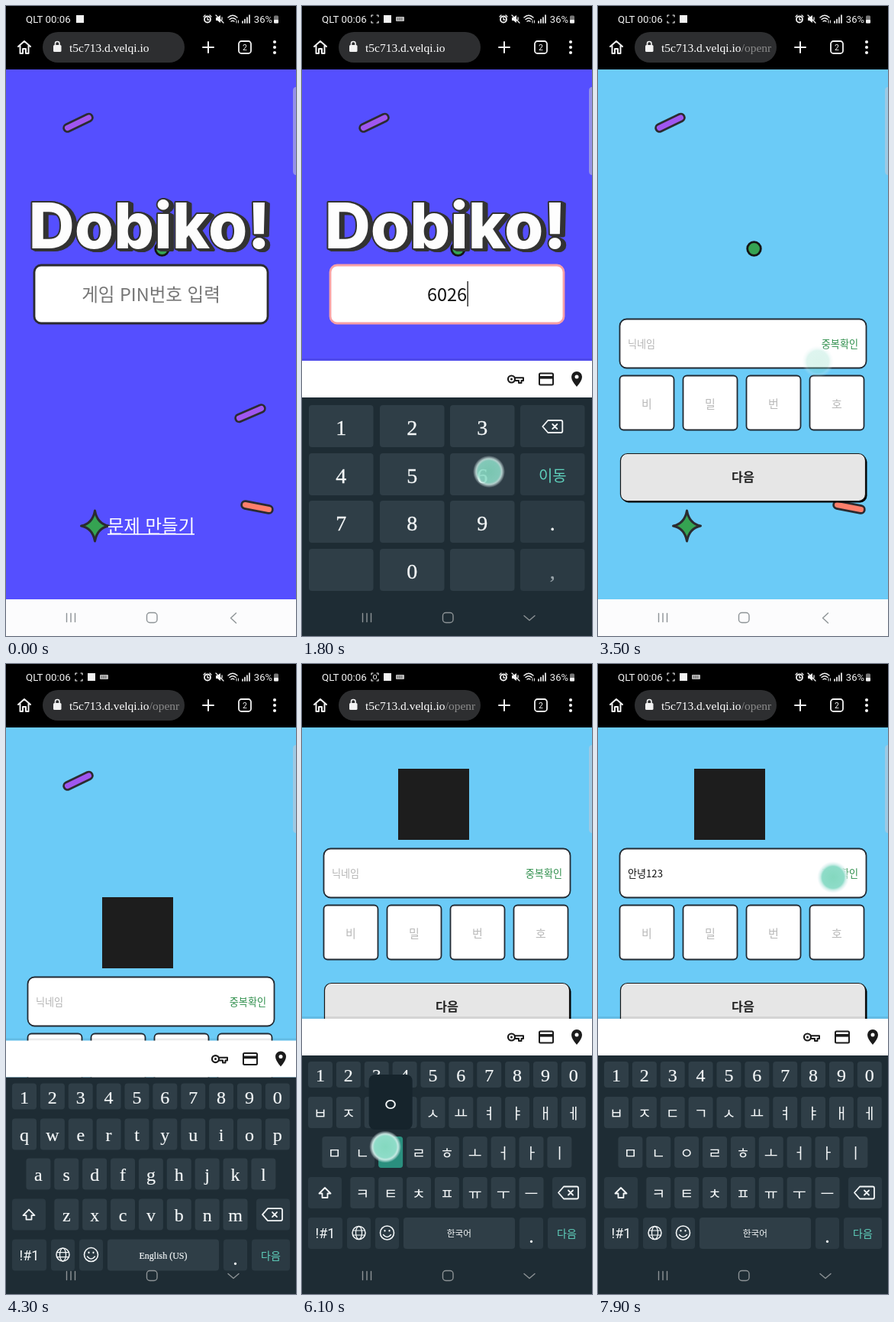
Write an HTML page that moves like this. It is 380 px wide and 824 px high and loops after 8 s.

```html
<!DOCTYPE html>
<html lang="ko">
<head>
<meta charset="utf-8">
<title>Quiz sign-in</title>
<style>
  html, body { margin: 0; width: 100%; height: 100%; overflow: hidden; background: #000; }
  svg { display: block; width: 380px; height: 824px; }
  text { font-family: "Noto Sans CJK KR", "Noto Sans CJK JP", "Noto Sans", sans-serif; white-space: pre; }
  .mid { text-anchor: middle; }
  .end { text-anchor: end; }
  .roboto { font-family: Roboto, sans-serif; }
  .serif { font-family: "Liberation Serif", serif; }
  .title { font: 800 83px Inter, sans-serif; text-anchor: middle; stroke-linejoin: round; }
  .key { fill: #2f3e47; }
  .fn { fill: #2b3a43; }
  .line { fill: none; stroke-linecap: round; stroke-linejoin: round; }
</style>
</head>
<body>
<svg id="stage" viewBox="0 0 380 824"></svg>
<script>
const LOOP = 8000;
const INK = '#2b2b30', TEAL = '#5fd0bc', LIGHT = '#f4f7f8';

const rect = (x, y, w, h, r, attrs) =>
  `<rect x="${x}" y="${y}" width="${w}" height="${h}" rx="${r}" ${attrs}/>`;
const text = (x, y, size, fill, str, cls = 'mid', attrs = '') =>
  `<text x="${x}" y="${y}" font-size="${size}" fill="${fill}" class="${cls}" ${attrs}>${str}</text>`;
const line = (d, color, width, attrs = '') =>
  `<path class="line" d="${d}" stroke="${color}" stroke-width="${width}" ${attrs}/>`;
const group = (id, body, attrs = '') => `<g id="${id}" ${attrs}>${body}</g>`;
const stick = (d, color) => line(d, INK, 12.5) + line(d, color, 7);

/* ---------- browser and system bars ---------- */
function topBar() {
  const w = '#f2f2f2';
  const status =
    text(26, 22, 13.3, w, 'QLT 00:06', 'roboto') +
    group('shot',
      line('M91 14V12H93M98 12H100V14M100 20V22H98M93 22H91V20', w, 1.2) +
      group('shotDot', rect(93.5, 14.5, 4, 5, 1, `fill="none" stroke="${w}"`))) +
    group('badge', rect(92, 12, 10, 10, 0, `fill="${w}"`)) +
    group('kbIcon', rect(123, 14, 11, 6, 1, 'fill="#bbb"') +
      line('M125 16H132M125 18H132', '#333', .8, 'stroke-dasharray="1 1.5"')) +
    `<circle cx="264" cy="17.5" r="4" fill="none" stroke="${w}" stroke-width="1.8"/>` +
    line('M264 15.5V18H266M259 14L261 12M269 14L267 12', w, 1.3) +
    `<path d="M275 15H277L281 12V22L277 19H275Z" fill="${w}"/>` +
    line('M275 12L285 22M283 15V18', w, 1.3) +
    line('M291 15Q297 9.500 303 15M293 17.500Q297 14 301 17.500M295 20Q297 18.500 299 20', w, 1.5) +
    line('M302 19V22M304.500 22V19', w, 1) +
    line('M310 22V20M313 22V17.500M316 22V15M319 22V12', w, 1.7) +
    text(349, 22, 13, w, '36%', 'roboto end') +
    rect(351, 12.5, 6, 10, 1.5, 'fill="#777"') + rect(351, 18, 6, 4.5, 1, `fill="${w}"`);
  const bar =
    rect(48, 34, 186, 40, 20, 'fill="#2d2e30"') +
    line('M16 53L24 46L32 53M18.500 52V62H22V56H26V62H29.500V52', w, 2) +
    rect(62, 51, 10.5, 9, 1.5, `fill="${w}"`) +
    line('M64.500 51V49Q64.500 46.500 67.200 46.500T70 49V51', w, 1.6) +
    text(83, 60, 15.5, '#fff', 't5c713.d.velqi.io<tspan id="path" fill="#8b8b8b">/openr</tspan>', 'serif') +
    line('M265 47V61M258 54H272', w, 2) +
    rect(305, 46, 16, 16, 3.5, `fill="none" stroke="${w}" stroke-width="1.8"`) +
    text(313, 58, 10.5, w, '2', 'roboto mid') +
    [47, 54, 61].map(y => `<circle cx="352" cy="${y}" r="2.1" fill="${w}"/>`).join('');
  return rect(0, 0, 380, 83, 0, 'fill="#000"') + status + bar;
}

const navIcons =
  line('M79.500 794.500V805.500M85 794.500V805.500M90.500 794.500V805.500', '#8d9396', 1.4) +
  rect(184.5, 793.5, 13.5, 13, 4, 'fill="none" stroke="#8d9396" stroke-width="1.4"') +
  group('back', line('M301.500 794L294.500 800.500L301.500 807', '#8d9396', 1.4)) +
  group('down', line('M291 797.500L298 803.500L305 797.500', '#8d9396', 1.4));

/* ---------- pages ---------- */
const shapes =
  stick('M80.500 159.500L108.500 146', '#a056f0') +
  stick('M305.500 539L334.500 526.500', '#a056f0') +
  stick('M313.500 652.500L344.500 658.500', '#ff7f6b') +
  '<circle cx="204.500" cy="317.500" r="8.800" fill="#35a352" stroke="#151515" stroke-width="2.800"/>' +
  `<path d="M116.500 660Q119.500 677 134.500 680Q119.500 683 116.500 700Q113.500 683 98.500 680Q113.500 677 116.500 660Z"
    fill="#35a352" stroke="${INK}" stroke-width="3" stroke-linejoin="round"/>`;

function bigButton(y, fill, label) {
  return rect(41, y + 3, 302, 78, 9, `fill="${INK}"`) +
    rect(40, y + 1.5, 301, 76.5, 8, `fill="${fill}" stroke="${INK}" stroke-width="2.800"`) +
    text(190, y + 49, 23.5, '#333', label);
}

function title() {
  const word = 'Dobiko!';
  let out = '';
  for (let i = 5; i >= 0; i--)
    out += `<text class="title" x="${188 + i}" y="${317 + i * .4}" fill="#333" stroke="#333" stroke-width="4">${word}</text>`;
  return out + `<text class="title" x="188" y="317" fill="#fdfdfd">${word}</text>`;
}

const homePage =
  rect(0, 83, 380, 693, 0, 'fill="#554fff"') + shapes + title() +
  rect(37, 339, 306, 76, 9, 'id="pinBox" fill="#fff" stroke-width="2.800"') +
  text(190, 386, 23.5, '#757575', '', 'mid', 'id="pin"') +
  rect(216.5, 360, 1.3, 33, 0, 'id="caret" fill="#111"') +
  text(190, 688.5, 23.5, '#fff', '문제 만들기') +
  rect(133, 690, 114, 1.6, 0, 'fill="#fff"') +
  group('choices', bigButton(438, '#cfe83d', '처음이에요!') + bigButton(536, '#c3d0ff', '이어하기 / 랭킹보기'));

const joinForm =
  rect(126, 305, 93, 93, 0, 'id="mark" fill="#1d1d1d"') +
  rect(28.5, 409.5, 323, 64, 9, 'fill="#fff" stroke="#222a33" stroke-width="1.800"') +
  text(39, 447, 13.1, '#b4b4b4', '', '', 'id="nick"') +
  text(341, 447, 13.1, '#2f8f4c', '중복확인', 'end') +
  [...'비밀번호'].map((c, i) =>
    rect(28.5 + i * 83, 483.5, 71, 71, 5, 'fill="#fff" stroke="#222a33" stroke-width="1.800"') +
    text(64 + i * 83, 525.5, 15, '#b9b9b9', c)).join('') +
  rect(31, 587.5, 321.5, 62, 9, 'fill="#000"') +
  rect(29.5, 585.5, 321, 62, 9, 'fill="#e6e6e6" stroke="#151515" stroke-width="1.200"') +
  text(190, 622, 16.3, '#222', '다음', 'mid', 'font-weight="700"');

const joinPage =
  rect(0, 83, 380, 693, 0, 'fill="#6bcbf7"') + group('joinShapes', shapes) + group('form', joinForm);

/* ---------- keyboards ---------- */
const spots = {};
const eraser = (x, y) =>
  line(`M${x - 13} ${y}L${x - 6} ${y - 8}H${x + 11}Q${x + 13} ${y - 8} ${x + 13} ${y - 6}V${y + 6}Q${x + 13} ${y + 8} ${x + 11} ${y + 8}H${x - 6}Z` +
    `M${x} ${y - 3}L${x + 6} ${y + 3}M${x + 6} ${y - 3}L${x} ${y + 3}`, LIGHT, 1.8);

function numPad() {
  const xs = [9, 102, 194, 286], ys = [522, 585, 647, 710];
  const labels = [...'123<456>789. 0 ,'];
  return labels.map((c, i) => {
    const col = i % 4, row = i >> 2, x = xs[col], y = ys[row], cx = x + 42.3;
    const box = rect(x, y, 84.5, 55, 4, `class="${col === 3 ? 'fn' : 'key'}"`);
    if (c === '<') return box + eraser(cx, 550);
    if (c === '>') return box + text(cx, y + 36.5, 20, TEAL, '이동');
    const fill = c === ',' ? '#9aa5ab' : LIGHT;
    return box + text(cx, y + 39, 28, fill, c, 'serif mid', `stroke="${fill}" stroke-width=".3"`);
  }).join('');
}

const PITCH = 36.87;
function keyRow(str, x0, y, h, korean) {
  return [...str].map((c, i) => {
    const x = x0 + i * PITCH;
    spots[c] = { x, y, h };
    const label = korean
      ? text(x, y + 29, 19.5, LIGHT, c, 'mid', 'font-weight="500"')
      : text(x, y + (h < 40 ? 26 : 29), 24, LIGHT, c, 'serif mid', `stroke="${LIGHT}" stroke-width=".2"`);
    return rect(x - 16, y, 32, h, 4, 'class="key"') + label;
  }).join('');
}
const letters = (a, b, c, korean) =>
  keyRow(a, 24, 566, 41, korean) + keyRow(b, 42.4, 618, 41, korean) + keyRow(c, 79.3, 671, 41, korean);

function fullBoard() {
  const fn = (x, y, w, cls = 'fn') => rect(x, y, w, 41, 4, `class="${cls}"`);
  return keyRow('1234567890', 24, 520, 34) +
    fn(8, 671, 44) + line('M30 685L22.500 692.500H26.500V698H33.500V692.500H37.500Z', LIGHT, 1.8) +
    fn(328, 671, 44) + eraser(349, 691.5).replace('stroke-width="1.800"', '') +
    fn(8, 724, 45) + text(30.5, 751, 18, LIGHT, '!#1', 'roboto mid') +
    fn(59, 724, 31) +
    '<circle cx="74.500" cy="744" r="8.500" fill="none" stroke="#f4f7f8" stroke-width="1.500"/>' +
    '<ellipse cx="74.500" cy="744" rx="4" ry="8.500" fill="none" stroke="#f4f7f8" stroke-width="1.300"/>' +
    line('M66.500 741H82.500M66.500 747H82.500', LIGHT, 1.2) +
    fn(96, 724, 31) +
    '<circle cx="111.500" cy="744" r="9" fill="none" stroke="#f4f7f8" stroke-width="1.600"/>' +
    line('M106.500 746.500Q111.500 752.500 116.500 746.500', LIGHT, 1.5) +
    line('M108.500 741V741.500M114.500 741V741.500', LIGHT, 2.2) +
    fn(133, 724, 146, 'key') + fn(285, 724, 31) + text(300.5, 757, 28, LIGHT, '.', 'serif mid') +
    fn(322, 724, 50) + text(347, 750, 14, TEAL, '다음') +
    group('latin', letters('qwertyuiop', 'asdfghjkl', 'zxcvbnm', false) +
      text(206, 749, 12, LIGHT, 'English (US)', 'serif mid', `stroke="${LIGHT}" stroke-width=".2"`)) +
    group('hangul', letters('ㅂㅈㄷㄱㅅㅛㅕㅑㅐㅔ', 'ㅁㄴㅇㄹㅎㅗㅓㅏㅣ', 'ㅋㅌㅊㅍㅠㅜㅡ', true) +
      text(206, 749, 11.7, LIGHT, '한국어'));
}

const fillBar =
  rect(0, 461, 380, 3, 0, 'fill="#000" opacity=".08"') +
  rect(0, 464, 380, 48, 0, 'fill="#fff"') +
  '<circle cx="274.500" cy="488" r="4.500" fill="none" stroke="#1b1b1b" stroke-width="2.200"/>' +
  '<circle cx="274.500" cy="488" r="1.500" fill="#1b1b1b"/>' +
  line('M279.500 486.200H290V490H287.500V493H284V490H279.500', '#1b1b1b', 2) +
  rect(311, 480.5, 18, 15, 1.5, 'fill="none" stroke="#1b1b1b" stroke-width="2"') +
  rect(311, 484, 18, 3.6, 0, 'fill="#1b1b1b"') +
  '<path fill-rule="evenodd" fill="#1b1b1b" d="M360 498Q353 490 353 485A7 7 0 0 1 367 485Q367 490 360 498ZM360 482.500A2.500 2.500 0 1 0 360 487.500A2.500 2.500 0 1 0 360 482.500Z"/>';

const stage = document.getElementById('stage');
stage.innerHTML =
  `<defs>
    <radialGradient id="glow">
      <stop offset="0" stop-color="#84d8bf"/><stop offset=".68" stop-color="#8edcc8"/>
      <stop offset=".8" stop-color="#cdeee8" stop-opacity=".95"/>
      <stop offset="1" stop-color="#e4f0f4" stop-opacity="0"/>
    </radialGradient>
  </defs>` +
  group('home', homePage) + group('join', joinPage) +
  '<path d="M380 106Q376 106 376 111V216Q376 221 380 221Z" fill="#c8c8d4" opacity=".55"/>' +
  rect(0, 776, 380, 48, 0, 'fill="#fcfcfd"') +
  group('board', fillBar + rect(0, 512, 380, 312, 0, 'fill="#1e2c34"') +
    group('pad', numPad()) + group('full', fullBoard()) +
    group('press',
      rect(-16, 0, 32, 41, 4, 'id="pressKey" fill="#2a8f7e"') +
      rect(-28.5, -81, 57, 72, 8, 'fill="#16242c"') +
      text(0, -33, 24, LIGHT, '', 'mid', 'id="pressText" font-weight="500"'))) +
  navIcons + topBar() +
  '<circle id="touch" r="21" fill="url(#glow)"/>';

/* ---------- timeline ---------- */
const el = id => document.getElementById(id);
const show = (id, on) => { el(id).style.display = on ? '' : 'none'; };

// [time, x, y, hold]
const pinTaps = [[1050, 245, 609], [1290, 144, 738], [1490, 150, 554], [1700, 245, 609], [1980, 146, 738], [2180, 148, 553]];
const pinCode = '602602';

// [time, key, text afterwards, hold]
const strokes = [
  [5950, 'ㅇ', 'ㅇ', 210], [6300, 'ㅏ', '아'], [6480, 'ㄴ', '안'],
  [6680, 'ㄴ', '안ㄴ'], [6860, 'ㅕ', '안녀'], [7040, 'ㅇ', '안녕'],
  [7220, '1', '안녕1'], [7370, '2', '안녕12'], [7520, '3', '안녕123']
];
const HOLD = 70, FADE = 240;
const taps = [
  [150, 190, 380], ...pinTaps, [2390, 330, 614],
  [3130, 288, 465, 200], [3960, 150, 442], [5050, 74, 744, 90],
  ...strokes.map(([at, k, , hold]) => {
    const { x, y, h } = spots[k], off = h > 40 ? -7 : 0;
    return [at, x + off, y + h / 2 + off, hold];
  }),
  [7760, 308, 279, 240]
];

const clamp = v => Math.min(1, Math.max(0, v));
const ease = v => 1 - (1 - clamp(v)) ** 3;
const lift = t => t < 3000
  ? ease((t - 350) / 350) - ease((t - 2440) / 200)
  : ease((t - 4100) / 350);

function drawTouch(t) {
  const tap = taps.filter(p => p[0] <= t).pop();
  const age = tap ? t - tap[0] - (tap[3] || HOLD) : FADE;
  const dot = el('touch');
  dot.setAttribute('opacity', 1 - clamp(age / FADE));
  if (tap) {
    dot.setAttribute('cx', tap[1]);
    dot.setAttribute('cy', tap[2]);
  }
}

function drawHome(t) {
  const typed = pinCode.slice(0, pinTaps.filter(p => p[0] + 50 <= t).length);
  const focus = t >= 250 && t < 2600;
  const pin = el('pin'), caret = el('caret');
  pin.textContent = typed || '게임 PIN번호 입력';
  pin.setAttribute('fill', typed ? '#111' : '#757575');
  el('pinBox').setAttribute('stroke', t < 250 ? INK : focus ? '#f7a0a6' : '#cdd6ff');
  caret.setAttribute('x', 190.4 + typed.length * 6.52);
  show('caret', focus && typed);
  show('choices', t >= 2600);
}

function drawJoin(t, raised) {
  const done = strokes.filter(s => s[0] + (s[3] || HOLD) <= t).pop();
  const nick = el('nick');
  nick.textContent = done ? done[2] : '닉네임';
  nick.setAttribute('fill', done ? '#111' : '#b4b4b4');
  show('mark', t >= 3600);
  show('joinShapes', !raised);
  el('form').setAttribute('transform', `translate(0 ${raised ? -168 : 0})`);
}

function drawBoard(t) {
  const up = lift(t), open = up > .01;
  el('board').setAttribute('transform', `translate(0 ${(1 - up) * 363})`);
  show('board', open);
  show('back', !open);
  show('down', open);
  show('kbIcon', open);
  show('pad', t < 3000);
  show('full', t >= 3000);
  show('latin', t < 5200);
  show('hangul', t >= 5200);

  const held = strokes.find(s => t >= s[0] && t < s[0] + (s[3] || HOLD));
  show('press', held);
  if (held) {
    const { x, y, h } = spots[held[1]];
    el('press').setAttribute('transform', `translate(${x} ${y})`);
    el('pressKey').setAttribute('height', h);
    el('pressText').textContent = held[1];
  }
}

function draw(t) {
  const joined = t >= 3330;
  show('home', !joined);
  show('join', joined);
  show('path', joined);
  show('shot', t >= 400);
  show('shotDot', t >= 5900 && t < 6700);
  el('badge').setAttribute('transform', `translate(${t >= 400 ? 15 : 0} 0)`);
  drawHome(t);
  drawJoin(t, t >= 4450);
  drawBoard(t);
  drawTouch(t);
}

let start;
function tick(now) {
  start ??= now;
  draw((now - start) % LOOP);
  requestAnimationFrame(tick);
}
draw(0);
requestAnimationFrame(tick);
</script>
</body>
</html>
```
